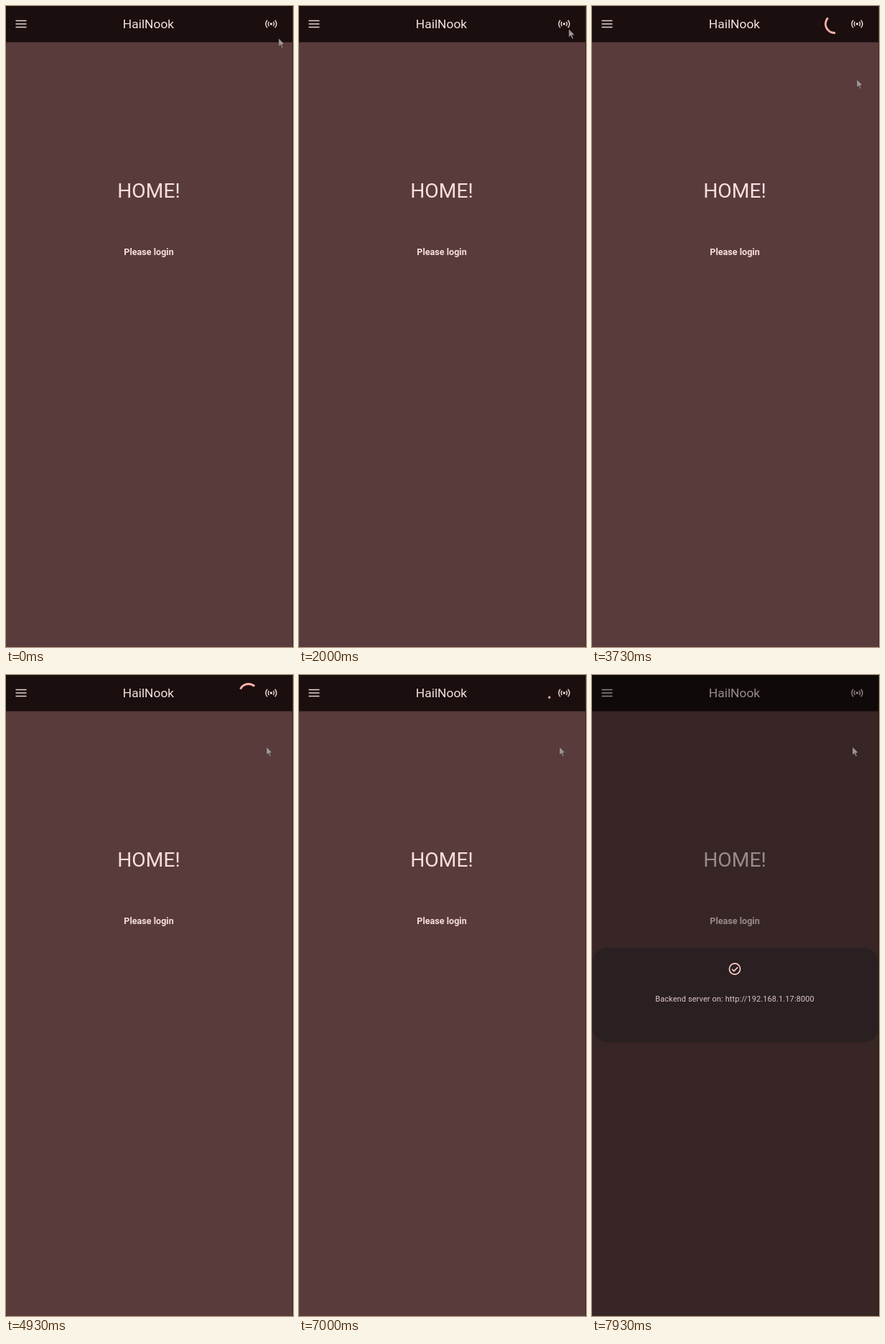
Recreate the animation shown at these times as an HTML page. Size 400 by 893 pixels, loop 8 s.

```html
<!DOCTYPE html>
<html lang="en">
<head>
<meta charset="utf-8">
<style>
html, body { margin: 0; height: 100%; overflow: hidden; background: #5a3b3b; }
svg { display: block; width: 100vw; height: 100vh; font-family: Roboto, sans-serif; }
text { text-anchor: middle; fill: #f5dfdd; }
.line { fill: none; stroke: #e9d3d1; stroke-width: 1.5; }
</style>
</head>
<body>
<svg viewBox="0 0 400 893">
  <rect width="400" height="893" fill="#5a3b3b"/>
  <rect width="400" height="50.5" fill="#1a0e0f"/>
  <rect x="399" width="1" height="893" fill="#3c2627"/>
  <path class="line" d="M13.5 20.5h15M13.5 25h15M13.5 29.5h15"/>
  <text x="198.5" y="31" font-size="17.4">HailNook</text>
  <g transform="translate(369.5 25)">
    <circle r="1.7" fill="#e9d3d1"/>
    <path class="line" d="M-2.9-2.9a4.1 4.1 0 0 0 0 5.8M2.9-2.9a4.1 4.1 0 0 1 0 5.8M-5.3-5.3a7.5 7.5 0 0 0 0 10.6M5.3-5.3a7.5 7.5 0 0 1 0 10.6"/>
  </g>
  <path id="spinner" fill="none" stroke="#ffb1aa" stroke-width="2.9"/>
  <text x="199" y="267" font-size="28.3">HOME!</text>
  <text x="199" y="347" font-size="12.6" font-weight="700">Please login</text>
  <g id="modal">
    <rect width="400" height="893" fill="#000" fill-opacity=".38"/>
    <rect y="380" width="400" height="132" rx="22" fill="#2b2021"/>
    <g fill="none" stroke="#ffd0cb" stroke-width="1.6">
      <circle cx="199" cy="409.5" r="7.6"/>
      <path d="M195.2 409.8l2.7 2.7 5.2-5.4"/>
    </g>
    <text x="199" y="455.3" font-size="10.95" letter-spacing=".13" style="fill:#dcc6c4">Backend server on: http://192.168.1.17:8000</text>
  </g>
  <path id="cursor" d="M0 0V11.5L2.7 9.2 4.6 13.7 6.4 13 4.6 8.7 8 8.3Z" fill="#a09697" stroke="#2c1a1b" stroke-opacity=".7" stroke-width=".7"/>
</svg>
<script>
const LOOP = 8000, SPIN_START = 2301, SPIN_END = 7440, CYCLE = 1224;
const [spinner, modal, cursor] = ['spinner', 'modal', 'cursor'].map(id => document.getElementById(id));
const clamp = x => Math.min(1, Math.max(0, x));

// time, x, y of the pointer tip
const path = [
  [0, 380, 45], [60, 380, 44], [330, 379, 38], [530, 379, 38], [860, 376, 31],
  [1300, 376, 31], [1330, 376, 32], [2230, 376, 32], [2800, 371, 104],
  [3500, 371, 104], [3730, 369, 102], [4200, 363, 100], [LOOP, 363, 100]
];

// cubic-bezier(x1, 0, x2, 1)
function ease(x, x1, x2) {
  let lo = 0, hi = 1, s;
  for (let i = 0; i < 24; i++) {
    s = (lo + hi) / 2;
    const at = 3 * (1 - s) ** 2 * s * x1 + 3 * (1 - s) * s * s * x2 + s ** 3;
    if (at < x) lo = s; else hi = s;
  }
  return 3 * (1 - s) * s * s + s ** 3;
}

function pointer(t) {
  const i = path.findIndex(p => p[0] > t), [a, b] = [path[i - 1], path[i]];
  const k = (t - a[0]) / (b[0] - a[0]);
  return [1, 2].map(n => a[n] + (b[n] - a[n]) * k);
}

// The head runs ahead in the first half of a cycle, the tail catches up in the second.
function arc(t) {
  const turns = (t - SPIN_START) / CYCLE, n = Math.floor(turns), u = turns - n;
  const head = ease(clamp(u * 2), .4, .2), tail = ease(clamp(u * 2 - 1), .4, 0);
  const base = -70 + 300 * n + 184 * turns;
  const from = base + 300 * tail, to = Math.max(base + 300 * head, from + 3);
  const point = deg => {
    const a = deg * Math.PI / 180;
    return `${338 + 12.5 * Math.cos(a)} ${25 + 12.5 * Math.sin(a)}`;
  };
  return `M${point(from)}A12.5 12.5 0 ${to - from > 180 ? 1 : 0} 1 ${point(to)}`;
}

function draw(now) {
  const t = now % LOOP;
  spinner.setAttribute('d', t >= SPIN_START && t < SPIN_END ? arc(t) : '');
  modal.setAttribute('opacity', 1 - (1 - clamp((t - 7470) / 320)) ** 2);
  cursor.setAttribute('transform', `translate(${pointer(t)})`);
}

let start;
function tick(now) {
  start ??= now;
  draw(now - start);
  requestAnimationFrame(tick);
}
draw(0);
requestAnimationFrame(tick);
</script>
</body>
</html>
```
